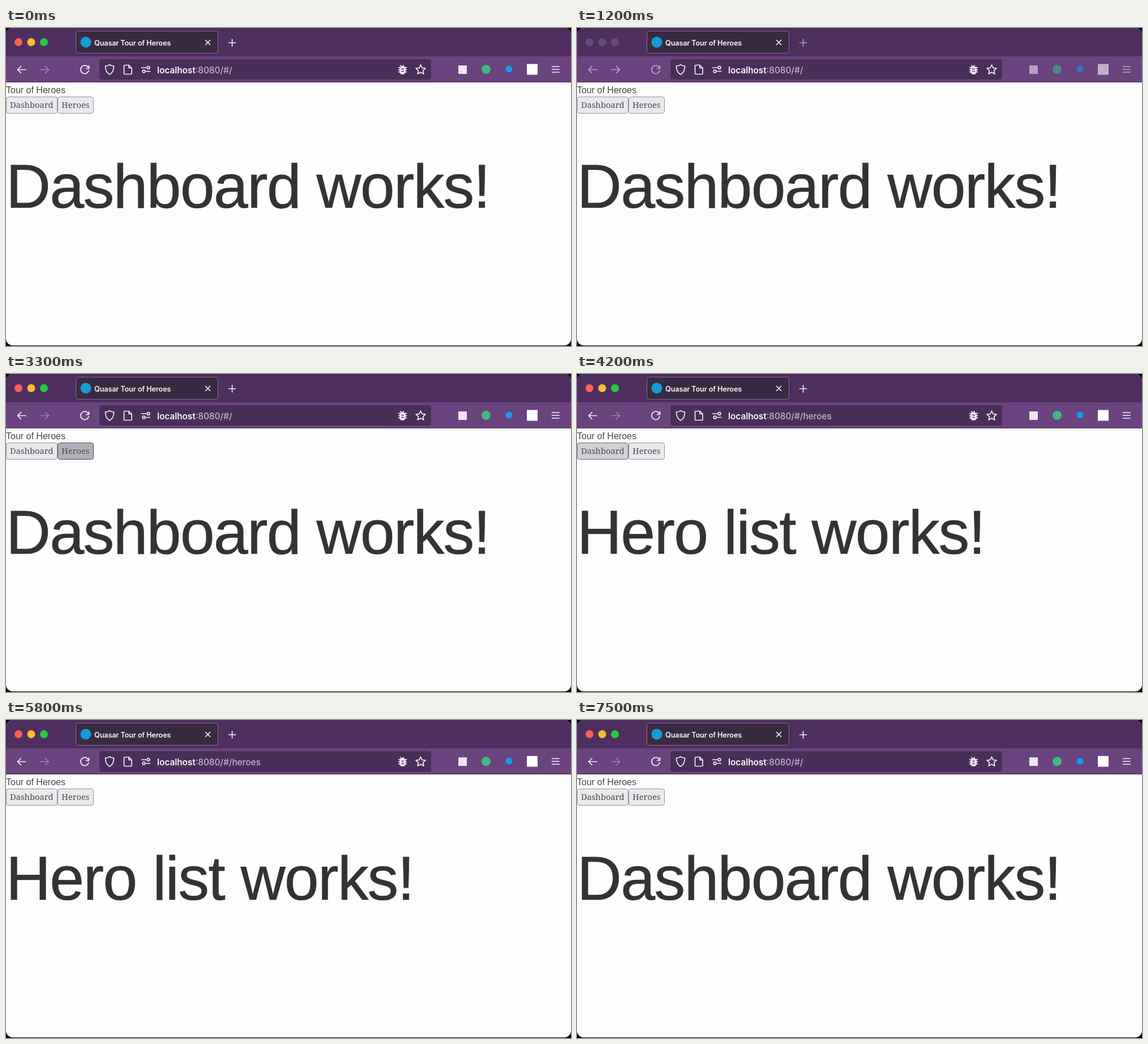
An HTML page for the animation above (7.7 s loop, 998x561 px).

```html
<!DOCTYPE html>
<html lang="en">
<head>
<meta charset="utf-8">
<title>Tour of Heroes</title>
<style>
  html, body { margin: 0; width: 100%; height: 100%; overflow: hidden; background: #000; }
  svg { display: block; width: 998px; height: 561px; }
  text { white-space: pre; }
  .ui { font-family: Inter, Roboto, sans-serif; }
  .page { font-family: "Liberation Sans", Arial, sans-serif; fill: #484848; }
  .title { font-size: 109.4px; letter-spacing: -.01562em; fill: #333331; stroke: #333331; stroke-width: .7; }
  .button text { font: 14.7px "Noto Serif", Georgia, serif; fill: #4d4d4d; }
  .button rect { stroke: #8f8f9d; fill: #e9e9ed; }
  .button.hover rect { fill: #d0d0d7; stroke: #676774; }
  .button.down rect { fill: #b1b1b9; stroke: #484851; }
  .line { fill: none; stroke: #f5eff7; stroke-width: 1.7; stroke-linecap: round; stroke-linejoin: round; }
  #forward { opacity: .38; }
  .idle .dim, .idle #forward { opacity: .58; }
  .idle .lights circle { fill: #68497c; }
</style>
</head>
<body>
<svg id="stage" viewBox="0 0 998 561">
  <defs>
    <clipPath id="window"><rect width="998" height="560" rx="12"/></clipPath>
  </defs>
  <g clip-path="url(#window)">
    <rect width="998" height="561" fill="#fdfdfd"/>
    <rect width="998" height="50" fill="#4d2e5f"/>
    <rect y="50" width="998" height="45" fill="#6a437f"/>
    <rect y="95" width="998" height="1" fill="#4a3159"/>

    <g class="lights">
      <circle cx="22" cy="25" r="7" fill="#ff5f57"/>
      <circle cx="44.5" cy="25" r="7" fill="#febc2e"/>
      <circle cx="67" cy="25" r="7" fill="#28c840"/>
    </g>
    <rect x="123.5" y="5.5" width="251" height="39" rx="4" fill="#382b41" stroke="#93649f"/>
    <circle cx="141" cy="25" r="9.5" fill="#169bd5"/>
    <text class="ui" x="156" y="31" font-size="12.7" font-weight="600" letter-spacing="-.15" fill="#faf7fb">Quasar Tour of Heroes</text>
    <path class="line" d="M352.500 21.500l8 8m0-8l-8 8"/>
    <path class="line dim" d="M393.500 26h12m-6-6v12"/>

    <path class="line dim" d="M35 73.500H20.500m6-6l-6 6 6 6"/>
    <path id="forward" class="line" d="M61 73.500h14.500m-6-6l6 6-6 6"/>
    <path class="line dim" d="M145.500 70a7.200 7.200 0 1 0 .6 5M146.500 66.500v5h-5"/>

    <rect x="165" y="55" width="586" height="36" rx="4" fill="#492e59"/>
    <g class="line">
      <path d="M183 64.500c2 2 5 2.500 7.500 2.500 0 7-2 12-7.500 15-5.500-3-7.500-8-7.500-15 2.500 0 5.500-.5 7.500-2.500z"/>
      <path d="M210 65.500h7l5 5v9.500q0 1.500-1.500 1.500h-10.500q-1.500 0-1.500-1.500v-13q0-1.500 1.500-1.500zm7 0v5h5"/>
      <path d="M239.500 70h8m7 6.500h-7"/>
      <circle cx="251.500" cy="70" r="2.300"/>
      <circle cx="243.500" cy="76.500" r="2.300"/>
      <path d="M732.500 65l2.500 5.400 6 .7-4.400 4 1.200 6-5.300-3-5.300 3 1.200-6-4.400-4 6-.7z"/>
      <path d="M693.500 69.500h14m-14 4h14m-14 4h14m-10.500-11.500l2 3m3-3l-2 3"/>
    </g>
    <rect x="695" y="67" width="11" height="15" rx="5.500" fill="#eee5f1"/>
    <path d="M698 72.500h5m-5 4h5" stroke="#59406a" stroke-width="1.600"/>
    <text class="ui" x="267" y="80" font-size="15.300" font-weight="500" fill="#c3b6cb"><tspan font-weight="600" fill="#fbf8fc">localhost</tspan>:8080/#/<tspan id="route"></tspan></text>

    <g class="dim">
      <rect x="799" y="66" width="15" height="15" fill="#eee5f1"/>
      <circle cx="848" cy="73" r="8" fill="#41b883"/>
      <circle cx="888.500" cy="72.500" r="6" fill="#159be9"/>
      <rect x="920" y="63.500" width="19" height="19" fill="#fff"/>
      <path class="line" d="M964.500 68h12.500m-12.500 5h12.500m-12.500 5h12.500"/>
    </g>

    <text class="page" y="115" font-size="16">Tour of Heroes</text>
    <g id="dashboard" class="button">
      <rect x=".5" y="121.500" width="90" height="29" rx="4"/>
      <text x="7" y="141">Dashboard</text>
    </g>
    <g id="heroes" class="button">
      <rect x="91.500" y="121.500" width="63" height="29" rx="4"/>
      <text x="98" y="141">Heroes</text>
    </g>
    <text id="title" class="page title" x="0" y="317"></text>
  </g>
</svg>
<script>
  const LOOP = 7700;
  const $ = id => document.getElementById(id);
  const within = (t, ...spans) => spans.some(([from, to]) => t >= from && t < to);

  function setButton(id, hover, down) {
    $(id).setAttribute("class", "button" + (down ? " down" : hover ? " hover" : ""));
  }

  function draw(now) {
    const t = now % LOOP;
    const list = within(t, [3400, 4400], [5400, 6200]);
    $("stage").classList.toggle("idle", within(t, [300, 1700]));
    $("route").textContent = list ? "heroes" : "";
    $("title").textContent = list ? "Hero list works!" : "Dashboard works!";
    setButton("dashboard",
      within(t, [4100, 4800], [5900, 6600]),
      within(t, [4300, 4400], [6100, 6200]));
    setButton("heroes",
      within(t, [3000, 3800], [5000, 5700]),
      within(t, [3300, 3400], [5300, 5400]));
    requestAnimationFrame(() => draw(performance.now()));
  }
  draw(0);
</script>
</body>
</html>
```
